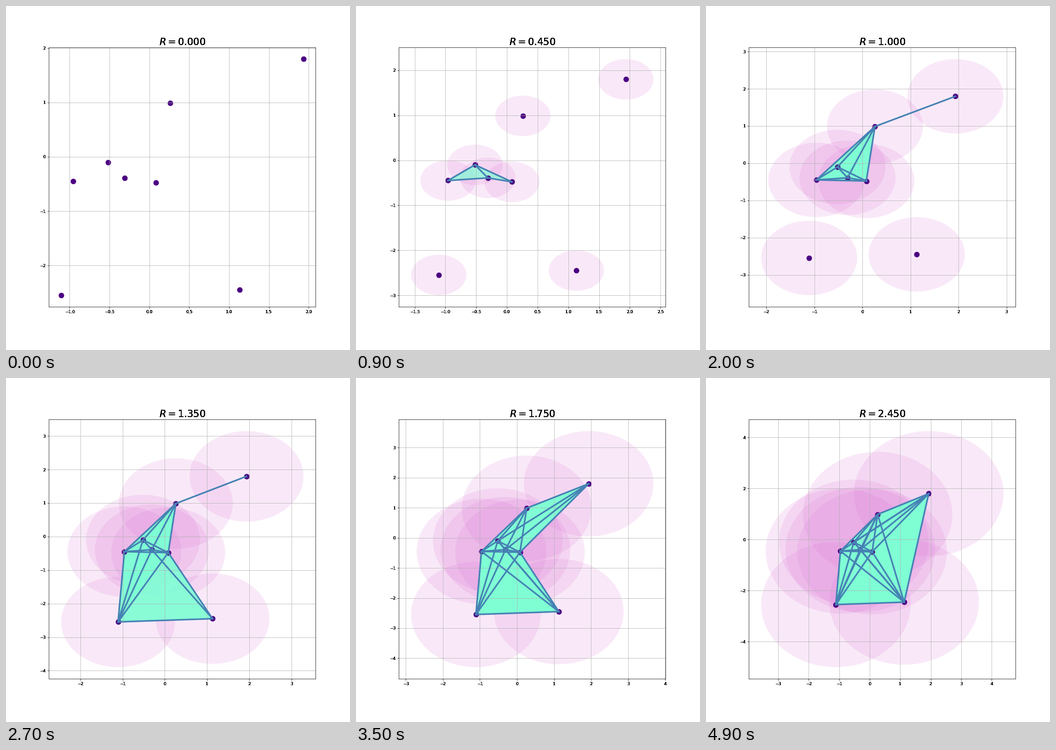
Animation, 748 px wide and 748 px high, one loop 5 s. Source, as a matplotlib script:

```python
from itertools import combinations

import matplotlib.pyplot as plt
import numpy as np
from matplotlib.animation import FuncAnimation
from matplotlib.collections import LineCollection
from matplotlib.patches import Circle, Polygon
from matplotlib.text import Text

SIZE, DPI = 748, 72
FRAMES, INTERVAL = 50, 100
RADIUS_STEP = 0.05
MARGIN = 0.05
TEXT_PASSES = 5

POINTS = np.array([
    (-1.108, -2.545), (-0.958, -0.449), (-0.5185, -0.100), (-0.309, -0.391),
    (0.0814, -0.478), (0.261, 0.987), (1.1305, -2.449), (1.935, 1.798),
])

fig, ax = plt.subplots(figsize=(SIZE / DPI, SIZE / DPI), dpi=DPI, facecolor="white")
fig.subplots_adjust(left=0.1249, right=0.9, bottom=0.1251, top=0.88)


def linked(simplex, radius):
    """True when all balls around the simplex vertices meet pairwise."""
    return all(np.hypot(*(POINTS[i] - POINTS[j])) <= 2 * radius
               for i, j in combinations(simplex, 2))


def simplices(order, radius):
    return [POINTS[list(s)] for s in combinations(range(len(POINTS)), order)
            if linked(s, radius)]


def fit_view(radius):
    low, high = POINTS.min(axis=0) - radius, POINTS.max(axis=0) + radius
    pad = MARGIN * (high - low)
    ax.set_xlim(low[0] - pad[0], high[0] + pad[0])
    ax.set_ylim(low[1] - pad[1], high[1] + pad[1])


def harden(text):
    """Paint the text several times so that its soft edges turn solid."""
    def paint(renderer):
        for _ in range(TEXT_PASSES):
            Text.draw(text, renderer)
    text.draw = paint


def draw(frame):
    radius = frame * RADIUS_STEP
    ax.clear()
    for point in POINTS:
        ax.add_patch(Circle(point, radius, color="orchid", alpha=0.15, lw=0, zorder=0.5))
    for corners in simplices(3, radius):
        ax.add_patch(Polygon(corners, color="aquamarine", alpha=0.7, lw=0, zorder=0.8))
    ax.scatter(*POINTS.T, s=120, color="indigo", zorder=1)
    ax.add_collection(LineCollection(simplices(2, radius), colors="steelblue",
                                     linewidths=3.5, capstyle="projecting", zorder=2),
                      autolim=False)
    fit_view(radius)
    ax.grid(True)
    ax.tick_params(labelsize=9)
    title = ax.set_title(f"$R = {radius:.3f}$", fontsize=21, pad=5)
    for text in [title, *ax.get_xticklabels(), *ax.get_yticklabels()]:
        harden(text)
    return []


anim = FuncAnimation(fig, draw, frames=FRAMES, init_func=lambda: [],
                     interval=INTERVAL, repeat=True, repeat_delay=0)
plt.show()
```
